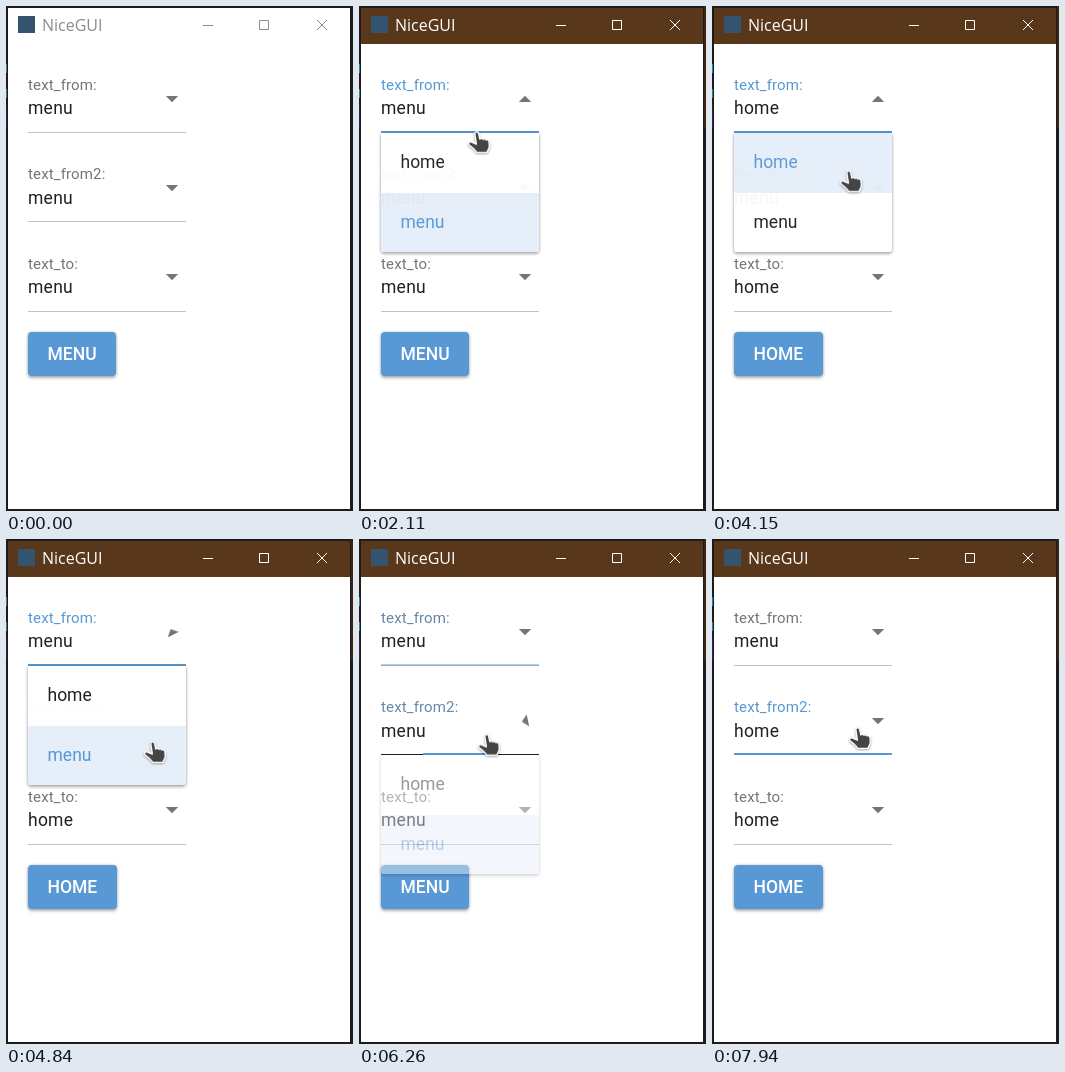
An HTML page for the animation above (8 s loop, 347 px wide and 505 px high).

```html
<!DOCTYPE html>
<html lang="en">
<head>
<meta charset="utf-8">
<title>NiceGUI</title>
<style>
html, body { margin: 0; width: 100%; height: 100%; overflow: hidden; background: #1d1b1c; }
svg { display: block; width: 347px; height: 505px; }
:root { --blue: #5898d4; --ink: #212121; --grey: #757575; --line: #c2c2c2; --tint: #e6eff9; --hover: #dadada; }
text { font: 17.5px Roboto, Arial, sans-serif; fill: var(--ink); }

/* every moving part shares the same 8 s clock */
.a { animation: 8s linear infinite; }
.s { animation: 8s step-end infinite; }

.title { font: 16px "Open Sans", "Noto Sans", sans-serif; }
.value { letter-spacing: .25px; }
.label { font-size: 15px; letter-spacing: .14px; fill: var(--grey); }
.caption { font-weight: 500; fill: #fff; }
.arrow { fill: var(--grey); }
.raised { filter: drop-shadow(0 0 1.5px rgba(0,0,0,.2)) drop-shadow(0 2px 1.5px rgba(0,0,0,.28)); }
.focus { fill: var(--blue); transform-origin: 101px 0; }
.cursor path { fill: #444; stroke: #fff; stroke-width: 1.4; stroke-linejoin: round; }
.cursor { filter: drop-shadow(0 1px 1px rgba(0,0,0,.35)); }

/* window activation */
#bar { animation-name: bar; }
@keyframes bar { 0% { fill: #fff } 10%, 100% { fill: #59371a } }
#titleText { animation-name: titleText; }
@keyframes titleText { 0% { fill: #8b8b8b } 10%, 100% { fill: #fff } }
#buttons { animation-name: buttons; }
@keyframes buttons { 0% { stroke: #8b8b8b } 10%, 100% { stroke: #fff } }
#edge { animation-name: edge; }
@keyframes edge { 0% { fill: #1d1b1c } 10%, 100% { fill: #3a2412 } }

/* values */
.from.home { animation-name: fromHome; }
@keyframes fromHome { 0%, 60% { opacity: 0 } 36.25% { opacity: 1 } 100% { opacity: 0 } }
.from.menu { animation-name: fromMenu; }
@keyframes fromMenu { 0%, 60% { opacity: 1 } 36.25% { opacity: 0 } 100% { opacity: 1 } }
.from2.home { animation-name: from2Home; }
@keyframes from2Home { 0% { opacity: 0 } 91.5%, 100% { opacity: 1 } }
.from2.menu { animation-name: from2Menu; }
@keyframes from2Menu { 0% { opacity: 1 } 91.5%, 100% { opacity: 0 } }
.to.home { animation-name: toHome; }
@keyframes toHome { 0%, 60.6% { opacity: 0 } 36.9%, 92.25%, 100% { opacity: 1 } }
.to.menu { animation-name: toMenu; }
@keyframes toMenu { 0%, 60.6% { opacity: 1 } 36.9%, 92.25%, 100% { opacity: 0 } }
#button { animation-name: button; }
@keyframes button { 0%, 60.6% { width: 88px } 36.9%, 92.25%, 100% { width: 89px } }

/* field focus and hover */
#label1 { animation-name: label1; }
@keyframes label1 { 0%, 22.4% { fill: var(--grey) } 25.5%, 76.25% { fill: var(--blue) } 80%, 100% { fill: var(--grey) } }
#label2 { animation-name: label2; }
@keyframes label2 { 0%, 76.25% { fill: var(--grey) } 80%, 100% { fill: var(--blue) } }
#focus1 { animation-name: focus1; }
@keyframes focus1 {
  0%, 22.4% { transform: scaleX(0); opacity: 1 }
  26%, 76.25% { transform: scaleX(1); opacity: 1 }
  80%, 99.9% { transform: scaleX(1); opacity: 0 }
  100% { transform: scaleX(0); opacity: 0 }
}
#focus2 { animation-name: focus2; }
@keyframes focus2 { 0%, 76.25% { transform: scaleX(0) } 80.5%, 100% { transform: scaleX(1) } }
#line1 { animation-name: line1; }
@keyframes line1 { 0%, 17.75% { fill: var(--line) } 22.25%, 35% { fill: #222 } 39%, 100% { fill: var(--line) } }
#line2 { animation-name: line2; }
@keyframes line2 { 0%, 67.6% { fill: var(--line) } 72%, 81% { fill: #222 } 85%, 100% { fill: var(--line) } }
#arrow1 { animation-name: arrow1; }
@keyframes arrow1 {
  0%, 22.4%, 39.75%, 48.2%, 63.5%, 100% { transform: rotate(0deg) }
  25.9%, 36.25%, 51.6%, 60% { transform: rotate(180deg) }
}
#arrow2 { animation-name: arrow2; }
@keyframes arrow2 { 0%, 76.75%, 95%, 100% { transform: rotate(0deg) } 80.25%, 91.5% { transform: rotate(180deg) } }

/* popups */
#popup1 { animation-name: popup1; animation-timing-function: ease; }
@keyframes popup1 {
  0%, 23.5%, 40%, 49%, 64.25%, 100% { opacity: 0 }
  27.25%, 36.5%, 52.75%, 60.5% { opacity: 1 }
}
#popup2 { animation-name: popup2; animation-timing-function: ease; }
@keyframes popup2 { 0%, 77.25%, 95.5%, 100% { opacity: 0 } 81%, 91.75% { opacity: 1 } }

#popup1 .top { animation-name: top1; }
@keyframes top1 { 0%, 54% { fill: #fff } 27% { fill: var(--hover) } 36.25% { fill: var(--tint) } 100% { fill: #fff } }
#popup1 .low { animation-name: low1; }
@keyframes low1 { 0%, 60% { fill: var(--tint) } 27% { fill: #fff } 54% { fill: var(--hover) } 100% { fill: var(--tint) } }
#popup1 .home { animation-name: home1; }
@keyframes home1 { 0%, 60% { fill: var(--ink) } 36.25% { fill: var(--blue) } 100% { fill: var(--ink) } }
#popup1 .menu { animation-name: menu1; }
@keyframes menu1 { 0%, 60% { fill: var(--blue) } 36.25% { fill: var(--ink) } 100% { fill: var(--blue) } }

#popup2 .top { animation-name: top2; }
@keyframes top2 { 0% { fill: #fff } 82.4% { fill: var(--hover) } 91.5%, 100% { fill: var(--tint) } }
#popup2 .low { animation-name: low2; }
@keyframes low2 { 0% { fill: var(--tint) } 82.4%, 100% { fill: #fff } }
#popup2 .home { animation-name: home2; }
@keyframes home2 { 0% { fill: var(--ink) } 91.5%, 100% { fill: var(--blue) } }
#popup2 .menu { animation-name: menu2; }
@keyframes menu2 { 0% { fill: var(--blue) } 91.5%, 100% { fill: var(--ink) } }

/* pointer */
#pointer { animation-name: pointer; }
@keyframes pointer {
  0%, 4.375% { transform: translate(306px, 506px) }
  7.5% { transform: translate(296px, 420px) }
  10% { transform: translate(284px, 290px) }
  12.5% { transform: translate(266px, 258px) }
  14.5% { transform: translate(228px, 212px) }
  17.75% { transform: translate(180px, 157px) }
  20.5% { transform: translate(134px, 97px) }
  22.75% { transform: translate(130px, 100px) }
  26.375% { transform: translate(118px, 126px) }
  28.75% { transform: translate(118px, 145px) }
  32.5%, 36.25% { transform: translate(122px, 152px) }
  41% { transform: translate(176px, 133px) }
  42.75% { transform: translate(179px, 137px) }
  45.125%, 46% { transform: translate(160px, 118px) }
  48.25% { transform: translate(140px, 120px) }
  51.875% { transform: translate(137px, 165px) }
  55.625% { transform: translate(138px, 205px) }
  59.75% { transform: translate(140px, 208px) }
  62.5% { transform: translate(165px, 190px) }
  65%, 66.25% { transform: translate(188px, 172px) }
  67.5% { transform: translate(179px, 179px) }
  70.5%, 72.25% { transform: translate(149px, 189px) }
  75.6% { transform: translate(128px, 192px) }
  80.6% { transform: translate(128px, 199px) }
  82.4% { transform: translate(124px, 219px) }
  86.75% { transform: translate(117px, 233px) }
  88.75%, 91.25% { transform: translate(116px, 238px) }
  95% { transform: translate(130px, 215px) }
  99.25%, 100% { transform: translate(146px, 189px) }
}
#hand { animation-name: hand; }
@keyframes hand { 0%, 64.1% { opacity: 0 } 17.75%, 67.3%, 100% { opacity: 1 } }
#tip { animation-name: tip; }
@keyframes tip { 0%, 17.75%, 67.3%, 100% { opacity: 0 } 4.375%, 64.1% { opacity: 1 } }
</style>
</head>
<body>
<svg viewBox="0 0 347 505">
  <!-- desktop edge and window -->
  <rect width="347" height="505" fill="#1d1b1c"/>
  <rect id="edge" class="s" x="345" width="2" height="122"/>
  <rect y="58" width="1" height="9" fill="#347f9f"/>
  <rect y="83" width="1" height="9" fill="#347f9f"/>
  <rect y="99" width="1" height="23" fill="#28264c"/>
  <rect x="2" y="2" width="342" height="501" fill="#fff"/>
  <rect id="bar" class="s" x="2" y="2" width="342" height="36"/>
  <rect x="12" y="10" width="17" height="17" fill="#34536f"/>
  <text id="titleText" class="title s" x="36" y="25">NiceGUI</text>
  <path id="buttons" class="s" fill="none" d="M197 19.5h10M253.5 14.5h9v9h-9zM311 14l10 10M321 14l-10 10"/>

  <!-- text_from -->
  <text id="label1" class="label a" x="22" y="84">text_from:</text>
  <text class="value from menu s" x="22" y="108">menu</text>
  <text class="value from home s" x="22" y="108">home</text>
  <g transform="translate(166 93)"><path id="arrow1" class="arrow a" d="M-6.2-3H6.2L0 3.2z"/></g>
  <rect id="line1" class="a" x="22" y="126" width="158" height="1"/>
  <rect id="focus1" class="focus a" x="22" y="125" width="158" height="2"/>

  <!-- text_from2 -->
  <text id="label2" class="label a" x="22" y="173">text_from2:</text>
  <text class="value from2 menu s" x="22" y="198">menu</text>
  <text class="value from2 home s" x="22" y="198">home</text>
  <g transform="translate(166 182)"><path id="arrow2" class="arrow a" d="M-6.2-3H6.2L0 3.2z"/></g>
  <rect id="line2" class="a" x="22" y="215" width="158" height="1"/>
  <rect id="focus2" class="focus a" x="22" y="214" width="158" height="2"/>

  <!-- text_to -->
  <text class="label" x="22" y="263">text_to:</text>
  <text class="value to menu s" x="22" y="287">menu</text>
  <text class="value to home s" x="22" y="287">home</text>
  <path class="arrow" transform="translate(166 271)" d="M-6.2-3H6.2L0 3.2z"/>
  <rect x="22" y="305" width="158" height="1" fill="#c2c2c2"/>

  <g class="raised"><rect id="button" class="s" x="22" y="326" width="88" height="44" rx="4" fill="#5898d4"/></g>
  <text class="caption to menu s" x="41.5" y="353.5">MENU</text>
  <text class="caption to home s" x="41.5" y="353.5">HOME</text>

  <g id="popup1" class="a" transform="translate(0 0)">
    <path class="raised" fill="#fff" d="M22 127h158v116q0 3-3 3H25q-3 0-3-3z"/>
    <rect class="top s" x="22" y="127" width="158" height="60"/>
    <path class="low s" d="M22 187h158v56q0 3-3 3H25q-3 0-3-3z"/>
    <text class="home s" x="41.5" y="162">home</text>
    <text class="menu s" x="41.5" y="222">menu</text>
  </g>
  <g id="popup2" class="a" transform="translate(0 89)">
    <path class="raised" fill="#fff" d="M22 127h158v116q0 3-3 3H25q-3 0-3-3z"/>
    <rect class="top s" x="22" y="127" width="158" height="60"/>
    <path class="low s" d="M22 187h158v56q0 3-3 3H25q-3 0-3-3z"/>
    <text class="home s" x="41.5" y="162">home</text>
    <text class="menu s" x="41.5" y="222">menu</text>
  </g>

  <g id="pointer" class="cursor a">
    <path id="tip" class="s" d="M0 0V16.5L4 13L6.6 18.6L9.3 17.4L6.8 12H12z"/>
    <path id="hand" class="s" d="M-2.2 1.6C-2.2-.7 1.2-.8 1.6 1.2L2.8 6.8C4 6 5.5 6.2 6 7.2C7.2 6.4 8.6 6.8 9 7.9C10.5 7.2 11.8 8 12 9.5L12.3 14C12.3 17 10.5 18 10 20.4H-.4C-1.5 17.5-5 15.5-8.2 12.4C-9.2 10.6-7 9.2-5.2 10L-.6 12z"/>
  </g>
</svg>
</body>
</html>
```
